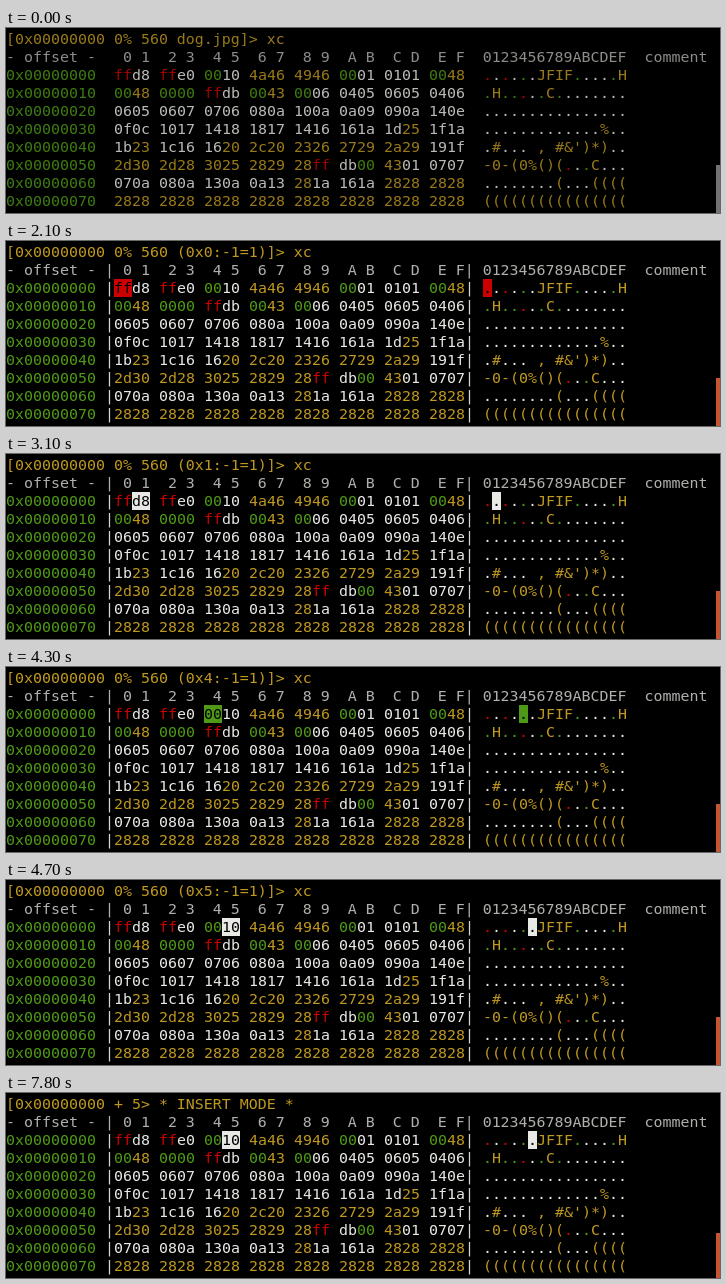
Animation, 714 px wide and 185 px high, one loop 8000 ms. Source, as an HTML page:

```html
<!DOCTYPE html>
<html lang="en">
<head>
<meta charset="utf-8">
<title>Hex editor</title>
<style>
  html, body { margin: 0; width: 100%; height: 100%; overflow: hidden; background: #000; }
  #term {
    position: absolute; left: 0; top: 2px;
    font: 14.95px/18px "DejaVu Sans Mono", monospace;
    font-variant-ligatures: none;
    color: #d3d7cf;
  }
  #term div { height: 18px; white-space: pre; }
  .white { --c: #e8e8e4; }
  .grey { --c: #b0b0ac; }
  .yellow { --c: #bf9820; }
  .green { --c: #4e9a16; }
  .red { --c: #cc0000; }
  span { color: var(--c); }
  .cursor { display: inline-block; height: 18px; background: var(--c); color: #000; }
  #bar { position: absolute; left: 710px; top: 137px; width: 4px; bottom: 0; background: #c4572f; }
  .idle #term { opacity: .8; }
  .idle #bar { background: #737270; }
</style>
</head>
<body>
<div id="term"></div>
<div id="bar"></div>
<script>
const LOOP = 8000;
const DUMP = [
  'ffd8ffe000104a464946000101010048',
  '00480000ffdb00430006040506050406',
  '060506070706080a100a0a09090a140e',
  '0f0c1017141818171416161a1d251f1a',
  '1b231c1616202c20232627292a29191f',
  '2d302d283025282928ffdb0043010707',
  '070a080a130a0a13281a161a28282828',
  '28'.repeat(16)
];

const step = (at, cursor) => ({ at, cursor, title: `[0x00000000 0% 560 (0x${cursor}:-1=1)]> xc` });
const plain = { cursor: -1, title: '[0x00000000 0% 560 dog.jpg]> xc' };
const insert = { cursor: 5, title: '[0x00000000 + 5> * INSERT MODE *' };
const STATES = [
  { ...plain, at: 0, idle: true },
  { ...plain, at: 600 },
  step(2100, 0), step(3100, 1), step(3500, 2), step(3900, 3), step(4300, 4), step(4700, 5),
  { ...insert, at: 6200 },
  { ...insert, at: 7800, barTop: 140 }
];

const term = document.getElementById('term');
const bar = document.getElementById('bar');

const escapeHtml = s => s.replace(/&/g, '&amp;').replace(/</g, '&lt;').replace(/>/g, '&gt;');
const span = (cls, text) => `<span class="${cls}">${escapeHtml(text)}</span>`;
const line = html => `<div>${html}</div>`;
const printable = b => b >= 32 && b < 127;

function colour(b) {
  if (b === 0) return 'green';
  if (b === 255) return 'red';
  return printable(b) ? 'yellow' : 'white';
}

function header(edge) {
  const digits = '0123456789ABCDEF';
  const pairs = digits.match(/../g).map(([a, b]) => ` ${a} ${b}`).join(' ');
  return line(span('grey', `- offset - ${edge}${pairs}${edge} ${digits}  comment`));
}

function dumpRow(hex, row, cursor, edge) {
  let bytes = '', chars = '';
  hex.match(/../g).forEach((pair, i) => {
    const b = parseInt(pair, 16);
    const cls = colour(b) + (row * 16 + i === cursor ? ' cursor' : '');
    bytes += span(cls, pair) + (i % 2 && i < 15 ? ' ' : '');
    chars += span(cls, printable(b) ? String.fromCharCode(b) : '.');
  });
  const offset = '0x' + (row * 16).toString(16).padStart(8, '0');
  return line(`${span('green', offset)} ${edge}${bytes}${edge} ${chars}`);
}

function render({ title, cursor, idle, barTop = 137 }) {
  const edge = cursor < 0 ? ' ' : '|';
  term.innerHTML = line(span('yellow', title)) + header(edge) +
    DUMP.map((hex, row) => dumpRow(hex, row, cursor, edge)).join('');
  document.body.classList.toggle('idle', !!idle);
  bar.style.top = barTop + 'px';
}

let shown;
function tick() {
  const t = performance.now() % LOOP;
  const state = STATES.findLast(s => s.at <= t);
  if (state !== shown) render(shown = state);
  requestAnimationFrame(tick);
}
tick();
</script>
</body>
</html>
```
